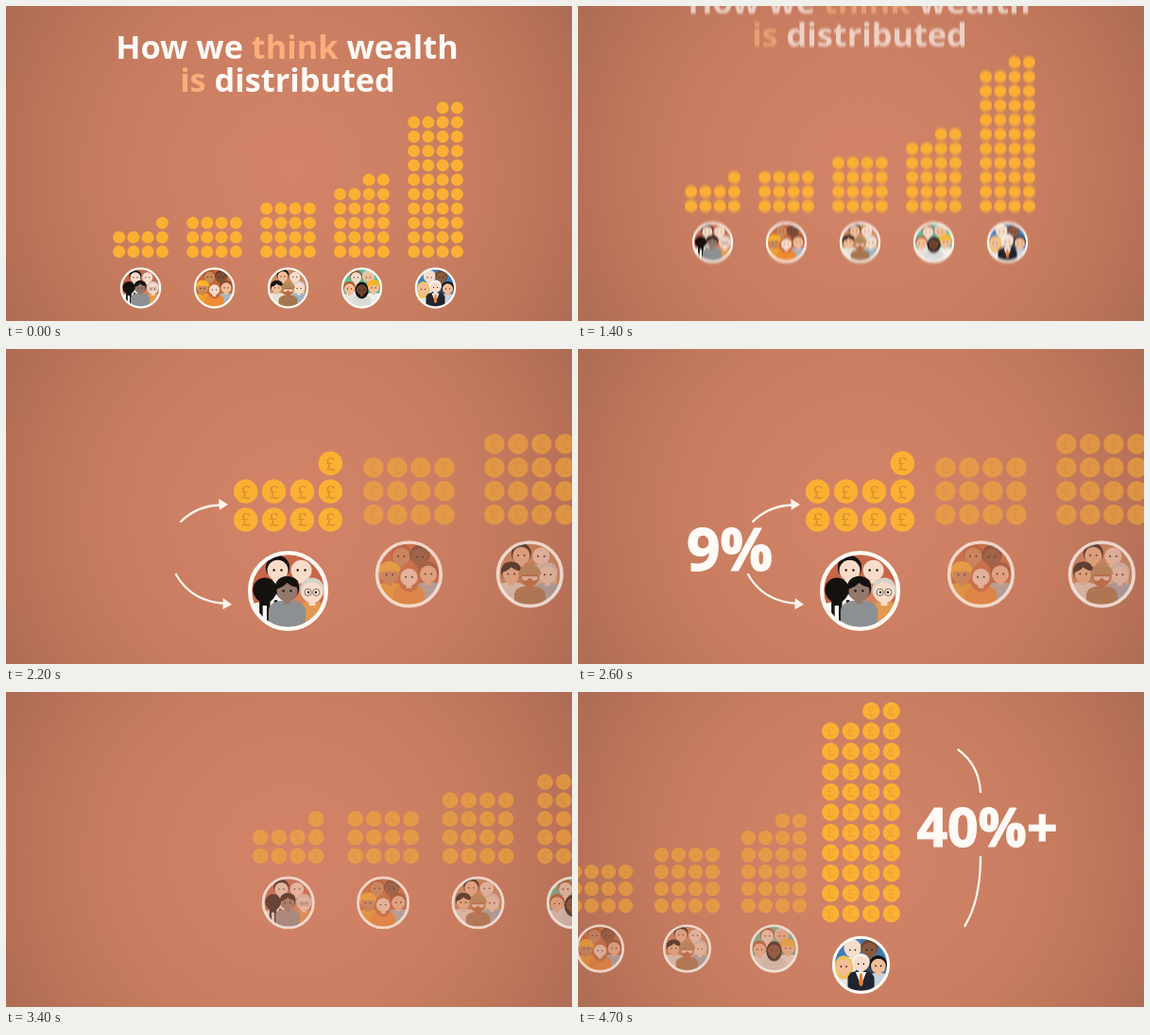
An HTML page that plays this animation: 599 px wide and 334 px high, repeating every 4.8 s.

```html
<!DOCTYPE html>
<html lang="en">
<head>
<meta charset="utf-8">
<title>How we think wealth is distributed</title>
<style>
  html, body { margin: 0; width: 100%; height: 100%; overflow: hidden; background: #b87058; }
  svg { display: block; width: 599px; height: 334px; }
  text { font-family: "Open Sans", "Noto Sans", sans-serif; font-weight: 700; text-anchor: middle; }
  .pound { font-family: "Noto Serif", "Liberation Serif", serif; font-weight: 400; font-size: 10.5px; fill: #d8902a; }
  .title { font-size: 34.3px; fill: #fffaf6; }
  .soft { fill: #fbae7c; }
  .number { fill: #fffaf6; stroke: #fffaf6; stroke-width: 1.2; stroke-linejoin: round; }
  .line { fill: none; stroke: #fdf3ea; stroke-width: 2.3; stroke-linecap: round; }
</style>
</head>
<body>
<svg id="stage" viewBox="0 0 599 334">
  <defs>
    <radialGradient id="glow" gradientUnits="userSpaceOnUse" cx="302" cy="175" r="340">
      <stop offset="0" stop-color="#d28368"/>
      <stop offset=".25" stop-color="#cf8165"/>
      <stop offset=".55" stop-color="#c87d60"/>
      <stop offset=".8" stop-color="#bc745a"/>
      <stop offset="1" stop-color="#ae6c55"/>
    </radialGradient>
    <clipPath id="disc"><circle r="20.5"/></clipPath>
    <filter id="blur" filterUnits="userSpaceOnUse" x="-400" y="-200" width="1400" height="800">
      <feGaussianBlur id="smear" stdDeviation="0 0"/>
    </filter>
  </defs>
  <rect width="599" height="334" fill="url(#glow)"/>
  <g id="blurBox"><g id="world">
    <g id="title">
      <text class="title" x="297.5" y="56">How we <tspan class="soft">think</tspan> wealth</text>
      <text class="title" x="298" y="91"><tspan class="soft">is</tspan> distributed</text>
    </g>
  </g></g>
  <g id="notes"></g>
</svg>
<script>
const LOOP = 4800, STEP = 100;
const NS = "http://www.w3.org/2000/svg";
const byId = id => document.getElementById(id);

function add(parent, tag, attrs = {}, text) {
  const el = document.createElementNS(NS, tag);
  for (const key in attrs) el.setAttribute(key, attrs[key]);
  if (text) el.textContent = text;
  return parent.appendChild(el);
}

const clamp = v => Math.min(1, Math.max(0, v));
const ease = p => p < .5 ? 4 * p ** 3 : 1 - 4 * (1 - p) ** 3;
const ramp = (t, from, to) => clamp((t - from) / (to - from));
const back = p => p <= 0 ? 0 : 1 + 2.4 * (p - 1) ** 3 + 1.4 * (p - 1) ** 2;

// Eased value from a list of [time, value] steps.
function track(t, steps) {
  let [t0, v0] = steps[0];
  for (const [t1, v1] of steps) {
    if (t < t1) return v0 + (v1 - v0) * ease(ramp(t, t0, t1));
    [t0, v0] = [t1, v1];
  }
  return v0;
}

const light = "#f8dcc9", pink = "#f3bd98", tan = "#c98a5c", brown = "#7d4e35";
const black = "#14110f", grey = "#d5d0cb", blond = "#efc15c", red = "#b2512b";

// Each person: x, y, skin, hair, shirt, extra.
const groups = [
  { count: 9, back: "#c9664a", people: [
    [-5.6, -12, light, black, "#fbf6f1"], [7.2, -12, light, "#c9664a", "#d9825c"],
    [-12.5, 0, black, black, "#fbf6f1", "plaits"], [13, 0, light, grey, "#e39a4e", "glasses"],
    [-.5, -.8, "#94796a", black, "#8d9092", "fringe"]] },
  { count: 12, back: "#c9683c", people: [
    [-5, -12.5, tan, red, "#cf6d3a"], [7, -12, brown, "#6b3a26", "#c9562c"],
    [-12.5, -.5, tan, "#f9b22c", "#f0a02c", "hat"], [12.5, -1, pink, "#8a4a30", "#a9b4bd"],
    [0, 1, light, "#c4673a", "#ee8b33", "long"]] },
  { count: 16, back: "#cb8a62", people: [
    [-5.5, -13, pink, black, "#c98355"], [7.3, -12.5, light, "#c98352", "#e0c79a"],
    [-12, -1, pink, black, "#e9e2d8", "fringe"], [11.5, -.5, light, grey, "#9db3c0"],
    [0, 1.5, "#b9683f", "#b08a5c", "#a5774f", "shades"]] },
  { count: 22, back: "#62bd97", people: [
    [-6, -12, light, "#9c5a33", "#dfe9e2"], [7, -12, pink, grey, "#3f9f7c"],
    [-13, 0, pink, red, "#e8e2da"], [12.5, -1, pink, "#f6b32f", "#f1eee9", "hat"],
    [0, 1, "#6d4431", black, "#d9dcd8", "long"]] },
  { count: 42, back: "#3f7cb5", people: [
    [-6.3, -12, light, light, "#dce6ee"], [6.3, -12, "#8a5a3f", "#6d4430", "#2b4460"],
    [-13, .5, pink, blond, "#e8e4df", "long"], [13, 0, pink, black, "#c6d2dd"],
    [0, -1.5, light, "#f4f0ea", "#20242f", "tie"]] }
];

function person(parent, [x, y, skin, hair, shirt, extra]) {
  const g = add(parent, "g", { transform: `translate(${x} ${y})` });
  add(g, "path", { d: "M-10 24V11Q-9 6 0 6T10 11V24Z", fill: shirt });
  if (extra === "plaits")
    for (const side of [-3, 1, 5]) add(g, "rect", { x: side, y: 5, width: 1.8, height: 14, fill: hair });
  if (extra === "long") add(g, "ellipse", { cy: 1.5, rx: 7, ry: 9, fill: hair });
  else add(g, "circle", { cy: -.6, r: 6.5, fill: hair });
  add(g, "rect", { x: -1.7, y: 4, width: 3.4, height: 4, fill: skin });
  add(g, "circle", { cy: .9, r: 5.6, fill: skin });
  if (extra === "fringe")
    add(g, "path", { d: "M-6.5 0Q-6.5 -7 0 -7T6.4 -1Q2 -1.4 0 -3.6Q-2 -1 -6.5 0Z", fill: hair });
  if (extra === "tie") {
    add(g, "path", { d: "M-4 7L0 17L4 7Z", fill: "#fff" });
    add(g, "path", { d: "M-1 8H1L1.5 16L0 18L-1.5 16Z", fill: "#ee7a2f" });
  }
  if (extra === "hat" || extra === "shades")
    add(g, "path", { d: "M-7.6 -1.4Q-6 -8 0 -8T7.6 -1.4Z", fill: hair });
  if (extra === "shades")
    add(g, "path", { d: "M-5 0H5V1.6Q2.5 4 .5 1H-.5Q-2.5 4 -5 1.6Z", fill: "#f3dcc4" });
  else for (const side of [-2, 2]) {
    add(g, "circle", { cx: side, cy: .8, r: .6, fill: black });
    if (extra === "glasses")
      add(g, "circle", { cx: side * 1.1, cy: .8, r: 1.9, fill: "none", stroke: "#776f6a", "stroke-width": .5 });
  }
}

const SPACE = 15.25;
groups.forEach((group, i) => {
  const x = 142.5 + 78 * i;
  group.x = x;
  group.el = add(byId("world"), "g");
  group.body = add(group.el, "g");
  group.signs = [];
  for (let n = 0; n < group.count; n++) {
    const cx = x + (1.5 - n % 4) * SPACE, cy = 260.5 - Math.floor(n / 4) * SPACE;
    add(group.body, "circle", { cx, cy, r: 6.5, fill: "#fbb034" });
    group.signs.push(add(group.body, "text", { class: "pound", x: cx, y: cy + 3.8 }, "£"));
  }
  const badge = add(group.body, "g", { transform: `translate(${x} 299)` });
  add(badge, "circle", { r: 20.5, fill: group.back });
  const crowd = add(badge, "g", { "clip-path": "url(#disc)" });
  group.people.forEach(p => person(crowd, p));
  group.ring = add(group.el, "circle", {
    cx: x, cy: 299, r: 20.6, fill: "none", stroke: "#fffaf4", "stroke-width": 2.2
  });
});
byId("world").appendChild(byId("title"));

function arrow(d, x, y, angle) {
  const line = add(byId("notes"), "path", { d, class: "line", pathLength: 100 });
  const head = add(byId("notes"), "path", {
    d: "M0 0L-10 -6L-9 6Z", fill: "#fdf3ea", transform: `translate(${x} ${y}) rotate(${angle})`
  });
  return part => {
    line.style.display = part > 0 ? "" : "none";
    line.setAttribute("stroke-dasharray", `${100 * part} 200`);
    head.style.display = part > .98 ? "" : "none";
  };
}

function number(text, x, base, size) {
  const el = add(byId("notes"), "text", { class: "number", "font-size": size, y: size * .357 }, text);
  const cy = base - size * .357;
  return (scale, opacity) => {
    el.setAttribute("transform", `translate(${x} ${cy}) scale(${scale})`);
    el.style.opacity = scale > 0 ? opacity : 0;
  };
}

const callouts = [
  { start: 1950, pop: 2250, end: 3050,
    arrows: [arrow("M185 183Q203 165 230 165.5", 235, 165, 2),
             arrow("M180 239Q196 268 233 270", 239, 271, 6)],
    label: number("9%", 160.5, 234.5, 62) },
  { start: 3680, pop: 3950, end: 4600,
    arrows: [arrow("M426 106C424 75 402 52 370 50", 364, 50, 184),
             arrow("M426 175C426 229 407 270 370 277", 364, 278, 170)],
    label: number("40%+", 433, 163.5, 57) }
];

const camera = t => ({
  x: track(t, [[1450, 299.5], [1900, 143.1], [3400, 143.1], [3850, 454.5]]),
  y: track(t, [[1245, 167], [1545, 255.2], [3400, 255.2], [3850, 210]]),
  zoom: track(t, [[1450, 1], [1950, 1.64], [3100, 1.64], [3590, 1.18]])
});

// Highlight amount and the height it grows from, for the first and last group.
const focus = {
  0: { y: 244, steps: [[1800, 0], [2100, 1], [3080, 1], [3380, 0]] },
  4: { y: 224, steps: [[3550, 0], [3880, 1]] }
};

function draw(t) {
  const cam = camera(t), past = camera(t - 5), next = camera(t + 5);
  byId("world").setAttribute("transform",
    `translate(299.5 167) scale(${cam.zoom}) translate(${-cam.x} ${-cam.y})`);

  const smear = axis => Math.min(4, Math.abs(next[axis] - past[axis]) * cam.zoom / 5);
  const sx = smear("x"), sy = smear("y");
  if (sx + sy > .2) {
    byId("smear").setAttribute("stdDeviation", `${sx} ${sy}`);
    byId("blurBox").setAttribute("filter", "url(#blur)");
  } else byId("blurBox").removeAttribute("filter");

  byId("title").style.opacity = 1 - ramp(t, 1320, 1560);

  const dim = track(t, [[1800, 0], [2100, 1]]);
  const sign = clamp((cam.zoom - 1.02) * 3);
  groups.forEach((group, i) => {
    const f = focus[i], lit = f ? track(t, f.steps) : 0;
    const y = f ? f.y : 0, shade = dim * (1 - lit);
    group.el.setAttribute("transform",
      `translate(${group.x} ${y}) scale(${1 + .195 * lit}) translate(${-group.x} ${-y})`);
    group.body.style.opacity = 1 - .45 * shade;
    group.ring.style.opacity = 1 - .28 * shade;
    group.signs.forEach(s => s.style.opacity = sign * (.35 + .6 * lit));
  });

  for (const c of callouts) {
    const part = ease(ramp(t, c.start, c.start + 200)) * (1 - ramp(t, c.end, c.end + 250));
    c.arrows.forEach(show => show(part));
    c.label(back(ramp(t, c.pop, c.pop + 250)), 1 - ramp(t, c.end + 120, c.end + 260));
  }
}

const begin = performance.now();
function tick() {
  const t = (performance.now() - begin) % LOOP;
  draw(Math.floor(t / STEP) * STEP);
  requestAnimationFrame(tick);
}
tick();
</script>
</body>
</html>
```
